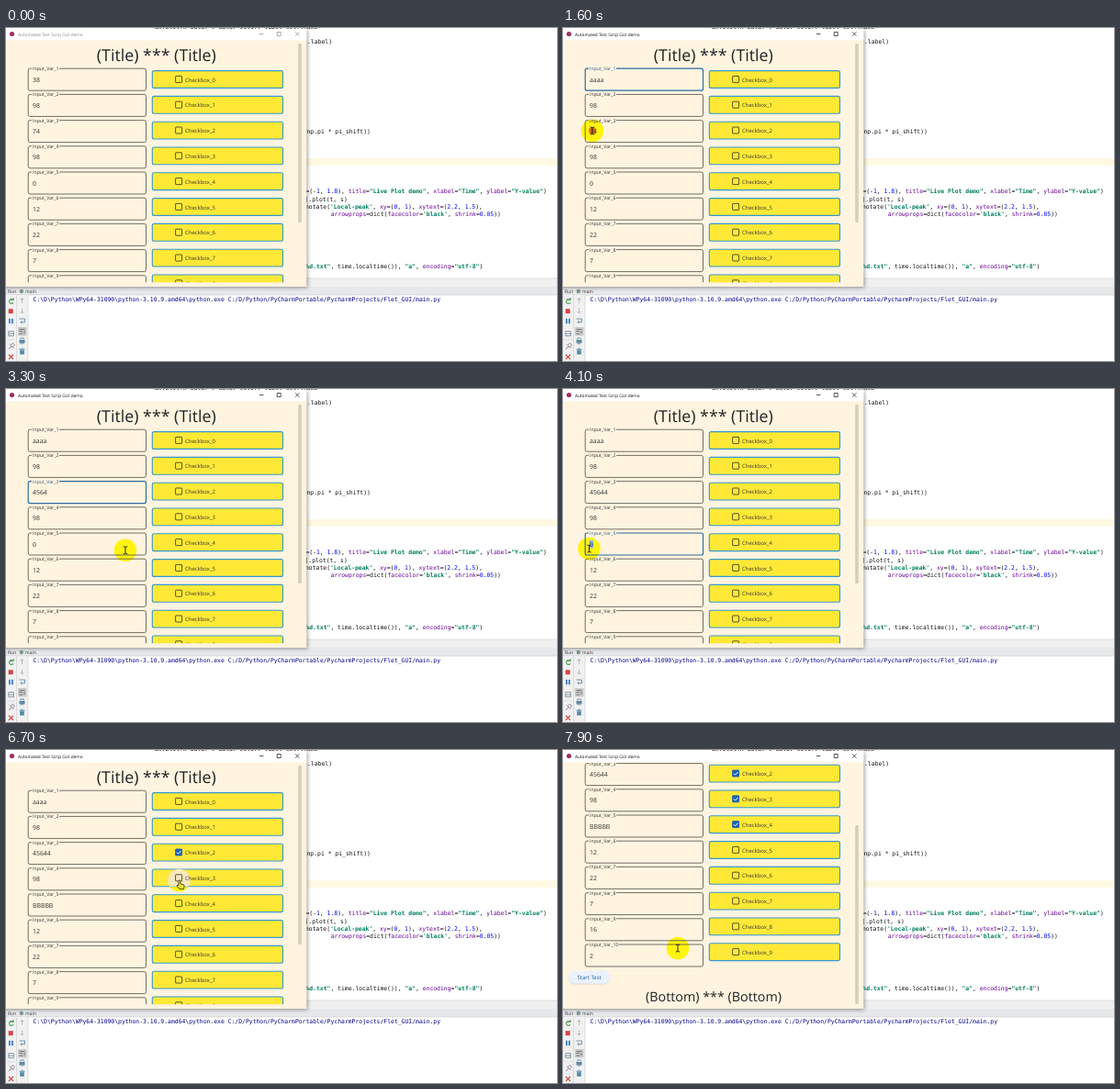
Recreate the animation shown at these times as an HTML page. Size 600 by 363 pixels, loop 8 s.

```html
<!DOCTYPE html>
<html lang="en">
<head>
<meta charset="utf-8">
<title>Form demo</title>
<style>
html, body { margin: 0; width: 100%; height: 100%; overflow: hidden; background: #fff; }
svg { display: block; width: 600px; height: 363px; }
text { font-family: "Open Sans", "Noto Sans", sans-serif; fill: #333; white-space: pre; text-rendering: geometricPrecision; }
.code { font: 6.41px "DejaVu Sans Mono", monospace; fill: #111; }
.code .s { fill: #008060; font-weight: bold; }
.code .k { fill: #660099; }
.code .n { fill: #0000ff; }
.label { font-size: 5.2px; }
.value { font-size: 6.9px; }
.check { font-size: 5.95px; }
.frame { fill: none; stroke: #4f4b45; stroke-width: .8; }
.focus .frame { stroke: #2a6c9f; stroke-width: 1.2; }
.focus .label { fill: #35607f; }
.button { fill: #ffe936; stroke: #3499cf; stroke-width: 1.1; }
.box { fill: none; stroke: #45442f; stroke-width: .9; }
.tick { fill: none; stroke: none; stroke-width: 1; }
.on .box { fill: #1f62b4; stroke: #1f62b4; }
.on .tick { stroke: #fff; }
.shadow { filter: drop-shadow(1px 1px 2px rgba(0, 0, 0, .4)); }
</style>
</head>
<body>
<svg id="stage" viewBox="0 0 600 363"></svg>
<script>
const LOOP = 8000, STEP = 100, SCROLL = 86;
const values = ["38", "98", "74", "98", "0", "12", "22", "7", "16", "2"];
const fieldY = i => 44.2 + 28.2 * i;
const checkY = i => 56 + 27.8 * i;

// [time, x, y] of the pointer
const path = [
  [100, 500, 287], [300, 380, 200], [600, 150, 75], [700, 44, 57], [900, 12, 57],
  [1000, 12, 57], [1200, 60, 70], [1300, 165, 88], [1400, 110, 110], [1500, 45, 112],
  [1600, 32, 112], [1800, 12, 112], [1900, 12, 112], [2200, 30, 118], [2500, 109, 141],
  [2700, 148, 147], [3000, 173, 177], [3200, 160, 176], [3600, 40, 175], [3800, 34, 190],
  [3900, 24, 178], [4100, 28.5, 174], [5300, 28.5, 174], [5700, 110, 150], [5900, 178.5, 119.2],
  [6100, 188, 113], [6400, 188, 113], [6700, 188.5, 142], [6900, 188, 144], [7100, 188, 170],
  [7200, 188, 170], [7400, 160, 196], [7600, 125, 216], [8000, 125, 216]
];
const typing = [
  { field: 0, text: "aaaa", times: [1000, 1100, 1200, 1300] },
  { field: 2, text: "45644", times: [2800, 3000, 3100, 3200, 3400] },
  { field: 4, text: "BBBBB", times: [4400, 4500, 4700, 4900, 5100] }
];
const focusSteps = [[0, -1], [700, 0], [1900, 2], [3700, 4], [6300, -1]];
const checkTimes = { 2: 6300, 3: 6800, 4: 7200 };
// from, to, field, width
const selections = [[800, 1000, 0, 9], [1900, 2800, 2, 4], [4000, 4400, 4, 4.4]];
const scrollSteps = [[0, 0], [7400, 0], [7500, 16], [7600, 48], [7700, 76], [7800, SCROLL], [8000, SCROLL]];

const text = (x, y, size, str, attrs = "") =>
  `<text x="${x}" y="${y}" font-size="${size}" ${attrs}>${str}</text>`;
const rect = (x, y, w, h, fill, attrs = "") =>
  `<rect x="${x}" y="${y}" width="${w}" height="${h}" fill="${fill}" ${attrs}/>`;
const line = (d, color, w = 1, attrs = "") =>
  `<path d="${d}" fill="none" stroke="${color}" stroke-width="${w}" ${attrs}/>`;
const code = (x, y, str) => `<text class="code" x="${x}" y="${y}">${str}</text>`;
const s = v => `<tspan class="s">${v}</tspan>`;
const k = v => `<tspan class="k">${v}</tspan>`;
const n = v => `<tspan class="n">${v}</tspan>`;

function editor() {
  return rect(327, 142, 273, 8, "#fff9e3") +
    code(328, 17.3, ".label)") +
    code(327.5, 115.3, "np.pi * pi_shift))") +
    code(326.4, 180.1, `=(-${n(1)}, ${n(1.8)}), ${k("title")}=${s('"Live Plot demo"')}, ${k("xlabel")}=${s('"Time"')}, ${k("ylabel")}=${s('"Y-value"')})`) +
    code(325.5, 188.5, "].plot(t, s)") +
    code(326, 196.8, `notate(${s("'Local-peak'")}, ${k("xy")}=(${n(0)}, ${n(1)}), ${k("xytext")}=(${n(2.2)}, ${n(1.5)}),`) +
    code(353.7, 205.1, `${k("arrowprops")}=dict(${k("facecolor")}=${s("'black'")}, ${k("shrink")}=${n(0.05)}))`) +
    code(326.4, 262.3, `${s('%d.txt"')}, time.localtime()), ${s('"a"')}, ${k("encoding")}=${s('"utf-8"')})`);
}

function runPanel() {
  return rect(0, 273, 600, 9, "#f0f0f0") + line("M327 273H600", "#d2d2d2", .7) +
    rect(0, 282, 600, 9, "#e6e8ea") + line("M0 291H600", "#cfcfcf", .7) +
    text(2, 289, 5, "Run") +
    '<circle cx="16.8" cy="287" r="2.2" fill="#7d9a86"/>' + text(21, 289, 5, "main") +
    rect(0, 291, 24, 72, "#f1f1f1") + line("M11.5 291V363M24 291V363", "#d0d0d0", .7) +
    line("M7.5 296.2A2.4 2.4 0 1 0 8 299.2M5 296.5H8.1V294", "#55a05c", 1.1) +
    rect(2.7, 306.2, 5, 5, "#d74444") +
    rect(3, 316.8, 1.8, 5.4, "#3b7fc0") + rect(6, 316.8, 1.8, 5.4, "#3b7fc0") +
    line("M2.8 330.7h5.6v5h-5.6zM2.8 333.2h5.6", "#7c919f", .9) + line("M1 340H10", "#d0d0d0", .6) +
    line("M3 350L6 347M4 344.5L8.5 349M5.5 345.5l2-2 2 2-2 2", "#8a7898", 1) +
    line("M3 356l5 5M8 356l-5 5", "#cf4a4a", 1.2) +
    line("M17.5 300V294.5M15.5 296.5l2-2 2 2", "#adb3b8", .9) +
    line("M17.5 305.5V311M15.5 309l2 2 2-2", "#adb3b8", .9) +
    line("M14.5 317H20.5V320.7H16M17.5 319.2l-1.7 1.5 1.7 1.5", "#6b8aa0", .9) +
    rect(13, 326, 9.5, 9.6, "#c9c9c9", 'rx="1"') +
    line("M14.5 328.5H20.5M14.5 330.5H18M14.5 333.2H18M20 330V333.2", "#6a6f7c", .9) +
    rect(14.5, 340, 6, 3.5, "#5f87a0") + line("M15.7 339.5V338H19.3V339.5M15.7 344H19.3", "#5f87a0", .9) +
    line("M14.5 350.3H20.5M16.5 349.3H18.5", "#4f8ba9", .9) + rect(15.2, 351.2, 4.6, 4.6, "#4f8ba9") +
    `<text class="code" x="29.5" y="298.2" style="fill:#00008b">C:\\D\\Python\\WPy64-31090\\python-3.10.9.amd64\\python.exe C:/D/Python/PyCharmPortable/PycharmProjects/Flet_GUI/main.py</text>`;
}

function field(v, i) {
  const y = fieldY(i), gap = i < 9 ? 58 : 61;
  return `<g class="field">
    <path class="frame" d="M${gap} ${y}H150.5q2 0 2 2v20q0 2-2 2H26.2q-2 0-2-2v-20q0-2 2-2h1.8"/>
    <text class="label" x="29" y="${y + 1.9}">Input_Var_${i + 1}</text>
    <text class="value" x="29" y="${y + 14.5}">${v}</text></g>`;
}

const button = i => rect(159.3, checkY(i) - 9.4, 142.2, 18.8, "#fff", 'rx="2" class="button"');

function checkbox(i) {
  const y = checkY(i);
  return `<g class="checkbox">
    <rect class="box" x="184.6" y="${y - 3.6}" width="7" height="7" rx=".5"/>
    <path class="tick" d="M186 ${y}l1.5 1.6 3-3.2"/>
    <text class="check" x="195" y="${y + 2.6}">Checkbox_${i}</text></g>`;
}

const rows = [...values.keys()];
const stage = document.getElementById("stage");
stage.innerHTML = `
<defs>
  <clipPath id="view"><rect x="0" y="14" width="327" height="263.3"/></clipPath>
  <clipPath id="buttons">${rows.map(button).join("")}</clipPath>
</defs>
${rect(0, 0, 600, 363, "#fff")}${editor()}${runPanel()}
${rect(-5, 1, 332.3, 281, "#fff4e0", 'class="shadow"')}${rect(0, 0, 327.3, 13.3, "#fff")}
<svg width="345" height="1">${code(162, 1, "ax.plot(x_data, y_data, color, label=self.name")}</svg>
<circle cx="6.5" cy="6.5" r="2.6" fill="#a03264"/>
<g id="titlebar">${text(13, 8.5, 4.76, "Automated Test Scrip GUI demo", 'style="fill:inherit"')}
  <path d="M276 6.5h4.4M295.2 4.5h4v4h-4zM315 4.3l4.4 4.4M319.4 4.3l-4.4 4.4" fill="none" stroke="currentColor" stroke-width=".7"/></g>
<circle id="glow" r="12.3" fill="#ffff10" style="mix-blend-mode:multiply"/>
<g clip-path="url(#view)">
  <g id="content">
    ${text(163.8, 36.2, 17.8, "(Title) *** (Title)", 'text-anchor="middle" style="fill:#222"')}
    <rect id="selection" x="28.6" height="8.8" fill="#8db9dd"/>
    ${values.map(field).join("")}${rows.map(button).join("")}
    <g clip-path="url(#buttons)"><circle id="pale" r="12.3" fill="#f8e8bd"/></g>
    ${rows.map(checkbox).join("")}
    ${rect(6, 327.6, 45.5, 14, "#d9d8d4", 'rx="7"')}${rect(6, 326.8, 45.5, 14, "#ebf2fb", 'rx="7"')}
    ${text(28.6, 336.1, 6, "Start Test", 'text-anchor="middle" font-weight="500" style="fill:#1d62ab"')}
    ${text(164, 360.2, 14.3, "(Bottom) *** (Bottom)", 'text-anchor="middle" style="fill:#222"')}
  </g>
</g>
${rect(318.2, 17, 3.6, 195, "#d8cebd", 'id="thumb" rx="1"')}
<g id="pointer">
  <circle id="press" cx="0" cy="0" r="4" fill="#c01818" opacity=".55"/>
  <g id="beam">${line("M-2.2-4Q0-4 0-3Q0-4 2.2-4M0-3V3M-2.2 4Q0 4 0 3Q0 4 2.2 4", "#222", 1)}</g>
  <path id="arrow" d="M0-.5V8.1L2 6.3 3.5 9.5 4.9 8.9 3.5 5.8H6.2Z" fill="#e6dc35" stroke="#33300c" stroke-width=".8"/>
  <path id="hand" d="M0 0q1.1-.6 1.4.6V4l3.4.8q1 .4.8 1.6L5 9.6H.4L-2.4 6q0-1.2 1.2-.8L-.6 6V.6Z" fill="#eee23c" stroke="#33300c" stroke-width=".8"/>
</g>`;

const el = id => document.getElementById(id);
const [titlebar, glow, content, pale, selection, thumb, pointer, press] =
  ["titlebar", "glow", "content", "pale", "selection", "thumb", "pointer", "press"].map(el);
const cursors = ["beam", "arrow", "hand"].map(el);
const fields = [...stage.querySelectorAll(".field")];
const boxes = [...stage.querySelectorAll(".checkbox")];
const show = (node, on) => node.setAttribute("visibility", on ? "inherit" : "hidden");

function along(table, t) {
  const i = Math.max(1, table.findIndex(p => p[0] >= t));
  const [a, b] = [table[i - 1], table[i]];
  const u = Math.max(0, (t - a[0]) / (b[0] - a[0]));
  return a.slice(1).map((v, j) => v + (b[j + 1] - v) * u);
}

function cursorAt(x, y) {
  if (x > 182 && x < 232 && rows.some(i => Math.abs(y - checkY(i)) < 7)) return "hand";
  if (x > 23 && x < 153 && rows.some(i => y > fieldY(i) && y < fieldY(i) + 24)) return "beam";
  return "arrow";
}

function draw(t) {
  const [scroll] = along(scrollSteps, t);
  content.setAttribute("transform", `translate(0 ${-scroll})`);
  thumb.setAttribute("y", 17 + 65 * scroll / SCROLL);

  const active = t >= 700;
  titlebar.style.fill = titlebar.style.color = active ? "#111" : "#888";

  const focus = focusSteps.filter(f => f[0] <= t).pop()[1];
  fields.forEach((f, i) => f.classList.toggle("focus", i === focus));
  for (const { field, text, times } of typing) {
    const count = times.filter(v => v <= t).length;
    fields[field].querySelector(".value").textContent = count ? text.slice(0, count) : values[field];
  }
  const sel = selections.find(v => t >= v[0] && t < v[1]);
  show(selection, sel);
  if (sel) {
    selection.setAttribute("y", fieldY(sel[2]) + 7.8);
    selection.setAttribute("width", sel[3]);
  }
  boxes.forEach((b, i) => b.classList.toggle("on", t >= checkTimes[i]));

  const [x, y] = along(path, t);
  const visible = t >= path[0][0];
  for (const [node, cy] of [[glow, y], [pale, y + scroll]]) {
    node.setAttribute("cx", x);
    node.setAttribute("cy", cy);
    show(node, visible);
  }
  pointer.setAttribute("transform", `translate(${x} ${y})`);
  show(pointer, visible);
  show(press, visible && t >= 1500 && t < 1800);
  const kind = cursorAt(x, y + scroll);
  cursors.forEach(c => show(c, c.id === kind));
}

const start = performance.now();
function tick() {
  const t = (performance.now() - start) % LOOP;
  draw(Math.floor(t / STEP) * STEP);
  requestAnimationFrame(tick);
}
tick();
</script>
</body>
</html>
```
